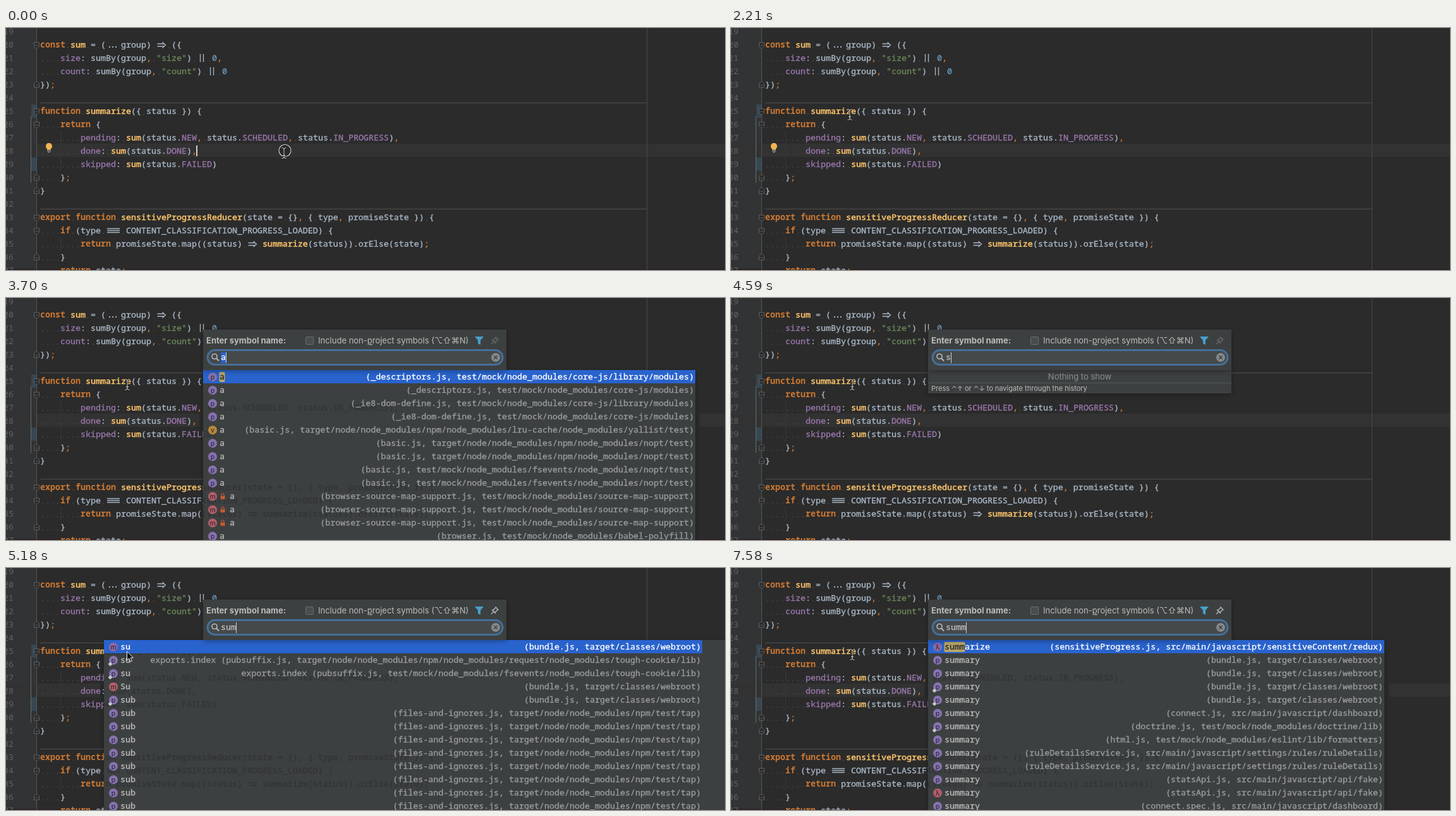
These frames come from a looping animation (1138x383 px, 8 s). An HTML page:

```html
<!DOCTYPE html>
<html lang="en">
<head>
<meta charset="utf-8">
<title>Go to symbol</title>
<style>
html, body { margin: 0; width: 100%; height: 100%; overflow: hidden; background: #2b2b2b; }
svg { display: block; width: 1138px; height: 383px; }
text { white-space: pre; }
.m { font: 13.333px "Noto Sans Mono", monospace; font-variant-ligatures: none; color: #a9b7c6; stroke-width: .35; }
.m, .m tspan { fill: currentColor; stroke: currentColor; }
.ui { font: 13px Inter, "DejaVu Sans", sans-serif; fill: #bbb; }
.k { color: #cc7832; font-weight: 700; stroke-width: 0; }
.f { color: #ffc66d; stroke-width: .5; }
.p { color: #9876aa; }
.s { color: #6a8759; }
.n { color: #6897bb; }
.c { color: #cc7832; }
.lig { fill: none; stroke: #a9b7c6; stroke-width: 1.3; }
.ghost .m, .ghost .m tspan { color: #323538; }
.ghost .lig { stroke: #323538; }
.num { color: #606366; stroke-width: 0; }
.dot { color: #4a4a4a; stroke-width: 0; }
.name { color: #bbb; }
.path { color: #999c9e; text-anchor: end; }
.on { color: #fff; }
.hit { color: #25282b; }
.tag { font: 10.5px Inter, sans-serif; fill: #231f2b; text-anchor: middle; }
</style>
</head>
<body>
<svg id="stage" viewBox="0 0 1138 383" xmlns="http://www.w3.org/2000/svg"></svg>
<script>
const LOOP = 8000, LEFT = 54, CELL = 8, ROW = 21, BASE = 4;
const code = [
  '',
  'const sum = (...group) => ({',
  '    size: sumBy(group, "size") || 0,',
  '    count: sumBy(group, "count") || 0',
  '});',
  '',
  'function summarize({ status }) {',
  '    return {',
  '        pending: sum(status.NEW, status.SCHEDULED, status.IN_PROGRESS),',
  '        done: sum(status.DONE),',
  '        skipped: sum(status.FAILED)',
  '    };',
  '}',
  '',
  'export function sensitiveProgressReducer(state = {}, { type, promiseState }) {',
  '    if (type === CONTENT_CLASSIFICATION_PROGRESS_LOADED) {',
  '        return promiseState.map((status) => summarize(status)).orElse(state);',
  '    }',
  '    return state;'
];
const rules = [
  ['s', '"[^"]*"'],
  ['k', '\\b(?:const|function|return|if|export)\\b'],
  ['f', '\\b(?:sum|summarize|sensitiveProgressReducer)\\b'],
  ['p', '\\b(?:size|count|pending|done|skipped|NEW|SCHEDULED|IN_PROGRESS|DONE|FAILED)\\b'],
  ['n', '\\b\\d+\\b'],
  ['c', '[,;]']
];
const lexer = new RegExp(rules.map(r => `(${r[1]})`).join('|'), 'g');
const ligature = /=>|===|\|\||\.\.\./g;

const mid = i => 6 + ROW * i;
const esc = s => s.replace(/&/g, '&amp;').replace(/</g, '&lt;');
const rect = (x, y, w, h, fill, more = '') =>
  `<rect x="${x}" y="${y}" width="${w}" height="${h}" fill="${fill}" ${more}/>`;
const label = (x, y, s, cls = 'm', more = '') =>
  `<text x="${x}" y="${y}" class="${cls}" ${more}>${s}</text>`;
const line = (x1, y1, x2, y2, stroke, more = '') =>
  `<path d="M${x1} ${y1}L${x2} ${y2}" fill="none" stroke="${stroke}" ${more}/>`;

const paint = s => esc(s).replace(lexer, (all, ...g) => {
  const hit = rules.findIndex((r, i) => g[i] !== undefined);
  return `<tspan class="${rules[hit][0]}">${all}</tspan>`;
});

function joined(op, x, y) {
  if (op === '...') {
    return [6, 11, 16].map(d => `<circle class="lig" cx="${x + d}" cy="${y + 3}" r=".5"/>`).join('');
  }
  const d = {
    '=>': `M${x + 1.5} ${y - 2}h10.5M${x + 1.5} ${y + 2}h10.5M${x + 9.5} ${y - 4.5}l5 4.5l-5 4.5`,
    '===': `M${x + 2} ${y - 3.5}h20M${x + 2} ${y - .5}h20M${x + 2} ${y + 2.5}h20`,
    '||': `M${x + 5.5} ${y - 7}v13M${x + 10.5} ${y - 7}v13`
  }[op];
  return `<path class="lig" d="${d}"/>`;
}

function codeRow(s, i) {
  const y = mid(i);
  let marks = '';
  const plain = s.replace(ligature, (op, at) => {
    marks += joined(op, LEFT + at * CELL, y);
    return ' '.repeat(op.length);
  });
  return label(LEFT, y + BASE, paint(plain)) + marks;
}

const dots = (s, i) =>
  label(LEFT, mid(i) + 8, s.replace(/[^ ]/g, '\u00a0').replace(/ /g, '·'), 'm dot');

function fold(i, closing) {
  const y = mid(i);
  const d = closing ? `M44.5 ${y + 4}h8v-6l-4-4l-4 4z` : `M44.5 ${y - 4}h8v6l-4 4l-4-4z`;
  return `<path d="${d}M46.5 ${y + .5}h4" fill="#2b2b2b" stroke="#636363"/>`;
}

const codeText = code.map(codeRow).join('');
const editor =
  rect(0, 0, 48, 383, '#313335') +
  rect(0, 183, 1138, 21, '#323232') +
  '<rect id="gap" y="183" height="21" fill="#2b2b2b"/>' +
  rect(0, 381, 1138, 2, '#2c2226') +
  rect(40, 121, 8, 21, '#374752') + rect(40, 205, 8, 21, '#374752') +
  line(39.5, 140, 39.5, 245, '#617072') +
  line(48.5, 0, 48.5, 383, '#555') + line(1014.5, 0, 1014.5, 383, '#484848') +
  line(LEFT, 118.5, 1014, 118.5, '#505050') + line(LEFT, 286.5, 1014, 286.5, '#505050') +
  line(86.5, 163, 86.5, 226, '#393939') + line(86.5, 331, 86.5, 352, '#393939') +
  code.map((s, i) => label(-4, mid(i) + BASE, 19 + i, 'm num')).join('') +
  [1, 6, 7, 14, 15].map(i => fold(i, false)).join('') +
  [4, 11, 12, 17].map(i => fold(i, true)).join('') +
  code.map(dots).join('') + codeText +
  `<g id="bulb"><path d="M68 182a5 5 0 0 1 3 9v2h-6v-2a5 5 0 0 1 3-9z" fill="#f0b452"/>
   <path d="M65 194.5h6M66 196.5h4" stroke="#aaa"/></g>` +
  rect(301, 186, 2, 17, '#d0d0d0', 'id="caret"');

// Each result: icon kind, name, location
const times = (n, row) => Array(n).fill(row);
const nm = 'node_modules';
const web = '(bundle.js, target/classes/webroot)';
const tap = `(files-and-ignores.js, target/node/${nm}/npm/test/tap)`;
const mock = `test/mock/${nm}`;
const support = `(browser-source-map-support.js, ${mock}/source-map-support)`;
const details = '(ruleDetailsService.js, src/main/javascript/settings/rules/ruleDetails)';
const stats = '(statsApi.js, src/main/javascript/api/fake)';
const lists = {
  a: { x: 312, right: 1091, end: 1091, match: 1, rows: [
    ['p', 'a', `(_descriptors.js, ${mock}/core-js/library/modules)`],
    ['p', 'a', `(_descriptors.js, ${mock}/core-js/modules)`],
    ['p', 'a', `(_ie8-dom-define.js, ${mock}/core-js/library/modules)`],
    ['p', 'a', `(_ie8-dom-define.js, ${mock}/core-js/modules)`],
    ['v', 'a', `(basic.js, target/node/${nm}/npm/${nm}/lru-cache/${nm}/yallist/test)`],
    ...times(2, ['p', 'a', `(basic.js, target/node/${nm}/npm/${nm}/nopt/test)`]),
    ...times(2, ['p', 'a', `(basic.js, ${mock}/fsevents/${nm}/nopt/test)`]),
    ...times(3, ['m lock', 'a', support]),
    ['p', 'a', `(browser.js, ${mock}/babel-polyfill)`]
  ] },
  s: { x: 312, right: 1102, end: 1138, match: 0, rows: [
    ...times(5, ['p', 's', web]), ...times(8, ['p', 's', tap])
  ] },
  su: { x: 155, right: 1102, end: 1138, match: 0, rows: [
    ['m violet', 'su', web],
    ['p pin', 'su', `exports.index (pubsuffix.js, target/node/${nm}/npm/${nm}/request/${nm}/tough-cookie/lib)`],
    ['p pin', 'su', `exports.index (pubsuffix.js, ${mock}/fsevents/${nm}/tough-cookie/lib)`],
    ['m', 'Su', web],
    ['p pin', 'sub', web],
    ...times(8, ['p', 'sub', tap])
  ] },
  summ: { x: 312, right: 1034, end: 1034, match: 4, rows: [
    ['λ violet', 'summarize', '(sensitiveProgress.js, src/main/javascript/sensitiveContent/redux)'],
    ...times(2, ['p', 'summary', web]),
    ...times(2, ['p pin', 'summary', web]),
    ['p', 'summary', '(connect.js, src/main/javascript/dashboard)'],
    ['p pin', 'summary', `(doctrine.js, ${mock}/doctrine/lib)`],
    ['p', 'summary', `(html.js, ${mock}/eslint/lib/formatters)`],
    ...times(2, ['p', 'summary', details]),
    ['p', 'summary', stats],
    ['λ', 'summary', stats],
    ['p', 'summary', '(connect.spec.js, src/main/javascript/dashboard)']
  ] }
};
const tones = { p: '#8672b0', v: '#b8893a', m: '#b25f6a', 'λ': '#b25f6a' };

function resultRow(list, [kind, name, where], i) {
  const y = 125 + ROW * i, cx = list.x + 15, first = i === 0;
  const sym = kind[0], has = w => kind.includes(w);
  const nameX = list.x + 26 + (has('lock') ? 16 : 0);
  let out = first ? rect(list.x, 114, list.right - list.x, ROW, '#2963cd') : '';
  out += `<circle cx="${cx}" cy="${y}" r="7" fill="${has('violet') ? '#8b69a8' : tones[sym]}"/>` +
    label(cx, y + 3.5, sym, 'tag');
  if (has('pin')) out += `<path d="M${cx - 5} ${y + 2.5}l3.5 3.5l-3.5 3.5l-3.5-3.5z" fill="#c3c7ca"/>`;
  if (has('lock')) {
    out += rect(cx + 12.5, y - .5, 7, 5, '#c75a32') +
      `<path d="M${cx + 14} ${y}v-2.5a2 2 0 0 1 4 0v2.5" fill="none" stroke="#c75a32" stroke-width="1.2"/>`;
  }
  const hit = first ? list.match : 0, on = first ? ' on' : '';
  if (hit) out += rect(nameX - .5, 117, hit * CELL + 1, 16, '#baa769', 'rx="2"');
  return out +
    label(nameX, y + BASE, `<tspan class="hit">${name.slice(0, hit)}</tspan>${name.slice(hit)}`, 'm name' + on) +
    label(list.right - 2, y + BASE, where, 'm path' + on);
}

const panels = Object.entries(lists).map(([id, l]) =>
  `<g id="list-${id}"><clipPath id="clip-${id}">${rect(l.x, 114, l.end - l.x, 269, '#000')}</clipPath>` +
  rect(l.x, 114, l.end - l.x, 269, '#3c3f41', 'filter="url(#soft)"') +
  `<g class="ghost" clip-path="url(#clip-${id})">${codeText}</g>` +
  l.rows.map((r, i) => resultRow(l, r, i)).join('') + '</g>').join('');

const dialog = '<g id="dialog">' +
  rect(312, 50, 480, 64, '#3c3f41', 'filter="url(#soft)"') +
  label(317, 72, 'Enter symbol name:', 'ui', 'style="font-weight:700"') +
  rect(474.5, 61.5, 12, 12, '#4a4d4f', 'stroke="#6b6e70" rx="1"') +
  label(494, 72, 'Include non-<tspan text-decoration="underline">p</tspan>roject symbols (⌥⇧⌘N)', 'ui') +
  '<path d="M742 61h14l-5 6v7l-4-2v-5z" fill="#46a0cb"/>' +
  '<path id="pin" d="M774.5 61.5l5 5M768 73l4-4M769 66l6 6M770.5 67l5-4.5l3 3l-4.5 5z" fill="none" stroke="#b4b8ba" stroke-width="1.4"/>' +
  rect(319, 82.5, 467, 23, '#45494a', 'rx="11.5" stroke="#456f99" stroke-width="3"') +
  '<circle cx="330" cy="92.5" r="4" fill="none" stroke="#b5b8ba" stroke-width="1.7"/>' +
  line(333, 95.5, 337, 99.5, '#b5b8ba', 'stroke-width="2"') +
  '<circle cx="775" cy="94" r="7" fill="#85898b"/>' +
  '<path d="M772.3 91.3l5.4 5.4M777.7 91.3l-5.4 5.4" stroke="#3c3f41" stroke-width="1.4"/>' +
  rect(340, 86, 8, 17, '#2963cd', 'id="picked"') +
  label(340, 98, '', 'm name', 'id="query"') +
  rect(348, 86, 1, 17, '#d0d0d0', 'id="bar"') + '</g>';

const empty = '<g id="empty">' + rect(312, 113, 480, 38, '#3c3f41', 'filter="url(#soft)"') +
  line(312, 113.5, 792, 113.5, '#333638') +
  label(552, 129, 'Nothing to show', 'ui', 'text-anchor="middle" style="fill:#8c8f91"') +
  line(312, 134.5, 792, 134.5, '#55585a') +
  label(317, 147, 'Press ⌃↑ or ⌃↓ to navigate through the history', 'ui', 'style="font-size:11px"') + '</g>';

const beam = 'M-3.5 -8.5q3 0 3.5 2q.5-2 3.5-2M0 -7V7M-3.5 8.5q3 0 3.5-2q.5 2 3.5 2M-2 3.5h4';
const pointer = `<g id="mouse">
  <circle id="ring" cx="1.5" cy="-4" r="9.5" fill="#1c1c1c" fill-opacity=".4" stroke="#c8c8c8" stroke-width="1.2"/>
  <g id="beam" fill="none"><path d="${beam}" stroke="#111" stroke-width="2.6"/><path d="${beam}" stroke="#e4e4e4"/></g>
  <path id="arrow" d="M-.5 -5v14l3.2-3l2.3 5.2l2.4-1l-2.3-5.1h4.4z" fill="#080808" stroke="#f4f4f4"/></g>`;

const $ = id => document.getElementById(id);
$('stage').innerHTML =
  `<defs><filter id="soft" x="-5%" y="-20%" width="110%" height="150%">
   <feDropShadow dx="0" dy="2" stdDeviation="4" flood-color="#000" flood-opacity=".3"/></filter></defs>` +
  rect(0, 0, 1138, 383, '#2b2b2b') + editor + panels + empty + dialog + pointer;

// time, query, panel below the field
const views = [
  [0, '', ''], [3400, 'a', ''], [3700, 'a', 'a'], [4440, 's', ''], [4590, 's', 'empty'],
  [4740, 'su', 'empty'], [4880, 'su', 's'], [5180, 'sum', 'su'], [5330, 'summ', 'su'], [5480, 'summ', 'summ']
];
const moves = [
  [0, 440, 198], [150, 436, 204], [300, 420, 212], [450, 372, 206], [600, 300, 186], [740, 236, 160],
  [890, 190, 141], [1040, 164, 130], [1190, 155, 127], [1330, 140, 129], [1480, 130, 131], [1630, 127, 133],
  [1770, 134, 135], [1920, 152, 136], [2070, 172, 137], [2210, 188, 137], [2360, 192, 137]
];
const caretFlips = [300, 740, 1190, 1630, 2210, 2650, 3250];
const barFlips = [3990, 4440, 6080, 6530, 6980, 7580];

const at = (table, t) => table.filter(r => r[0] <= t).pop();
const lit = (flips, t) => flips.filter(f => f <= t).length % 2 === 0;
const show = (id, yes) => { $(id).style.display = yes ? '' : 'none'; };

function draw(t) {
  const [, query, panel] = at(views, t);
  const [, x, y] = at(moves, t);
  const list = lists[panel], open = query !== '', picked = query === 'a';
  show('caret', lit(caretFlips, t));
  show('bulb', !open);
  show('dialog', open);
  show('empty', panel === 'empty');
  for (const id in lists) show('list-' + id, id === panel);
  $('gap').setAttribute('x', list ? list.x - 6 : 0);
  $('gap').setAttribute('width', list ? list.end - list.x + 13 : 0);
  $('query').textContent = query;
  $('query').classList.toggle('on', picked);
  show('picked', picked);
  $('bar').setAttribute('x', 340 + CELL * query.length);
  show('bar', lit(barFlips, t));
  $('pin').style.opacity = t >= 4880 ? 1 : .35;
  $('mouse').setAttribute('transform', `translate(${x} ${y})`);
  show('ring', t < 150);
  show('arrow', panel === 'su');
  show('beam', panel !== 'su');
}

function tick() {
  draw(performance.now() % LOOP);
  requestAnimationFrame(tick);
}
tick();
</script>
</body>
</html>
```
